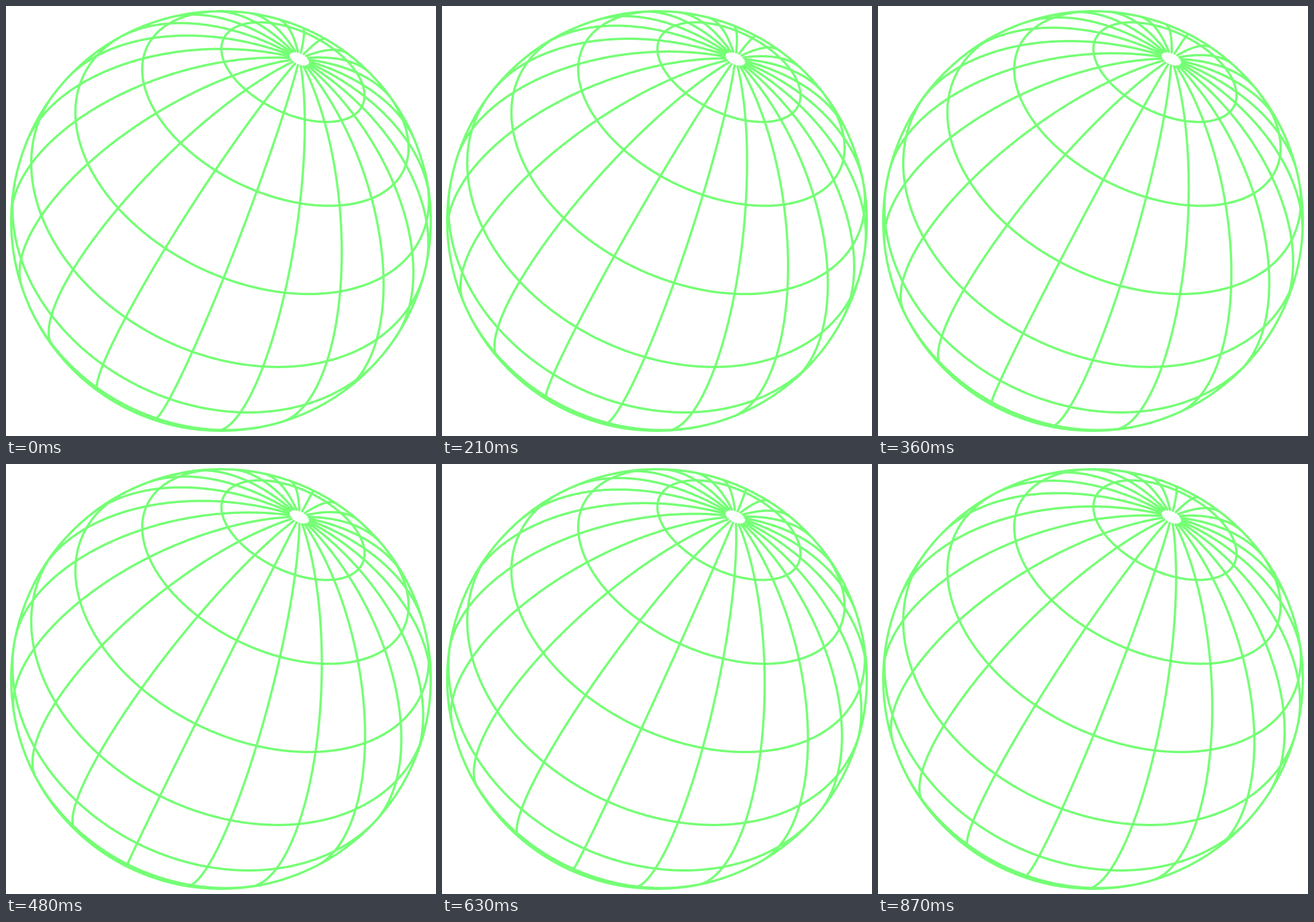
Animation of 748 by 748 pixels, one loop 900 ms. Source, as an HTML page with a canvas:

```html
<!DOCTYPE html>
<html>
<head>
<meta charset="utf-8">
<style>
html, body { margin: 0; overflow: hidden; background: #fff; }
canvas { display: block; }
</style>
</head>
<body>
<canvas id="stage" width="748" height="748"></canvas>
<script>
const ctx = document.getElementById("stage").getContext("2d");
const RAD = Math.PI / 180;
const CENTER = 374, RADIUS = 365;
const DISTANCE = 2.032;                           // camera distance in sphere radii
const FOCAL = RADIUS * Math.sqrt(DISTANCE ** 2 - 1);
const TILT = 36.69 * RAD, ROLL = 25.8 * RAD;      // pole away from the viewer, then clockwise
const SPACING = 15, POLE_GAP = 2, START = 6.2;
const FRAME = 30, FRAMES = 30;

// Screen position of a point on the globe, or null when it is behind the horizon.
function project(colatitude, longitude) {
  const a = colatitude * RAD, b = longitude * RAD;
  const side = Math.sin(a) * Math.sin(b);
  const front = Math.sin(a) * Math.cos(b);
  const up = Math.cos(a) * Math.sin(TILT) - front * Math.cos(TILT);
  const depth = Math.cos(a) * Math.cos(TILT) + front * Math.sin(TILT);
  if (depth < 1 / DISTANCE) return null;
  const scale = FOCAL / (DISTANCE - depth);
  return [
    CENTER + scale * (up * Math.sin(ROLL) + side * Math.cos(ROLL)),
    CENTER - scale * (up * Math.cos(ROLL) - side * Math.sin(ROLL))
  ];
}

function trace(from, to, pointAt) {
  let drawing = false;
  for (let v = from; v <= to; v += 0.5) {
    const p = pointAt(v);
    if (p) drawing ? ctx.lineTo(...p) : ctx.moveTo(...p);
    drawing = !!p;
  }
}

function draw(spin) {
  ctx.fillStyle = "#fff";
  ctx.fillRect(0, 0, 748, 748);
  ctx.strokeStyle = "#75ff75";
  ctx.lineWidth = 4;
  ctx.lineJoin = "round";
  ctx.beginPath();
  ctx.arc(CENTER, CENTER, RADIUS, 0, 2 * Math.PI);
  for (let lon = 0; lon < 360; lon += SPACING)
    trace(POLE_GAP, 100, v => project(v, lon + spin));
  for (let lat = SPACING; lat <= 90; lat += SPACING)
    trace(0, 360, v => project(lat, v));
  ctx.stroke();
}

function tick() {
  const step = Math.floor(performance.now() / FRAME) % FRAMES;
  draw(START + SPACING * step / FRAMES);
  requestAnimationFrame(tick);
}
tick();
</script>
</body>
</html>
```
